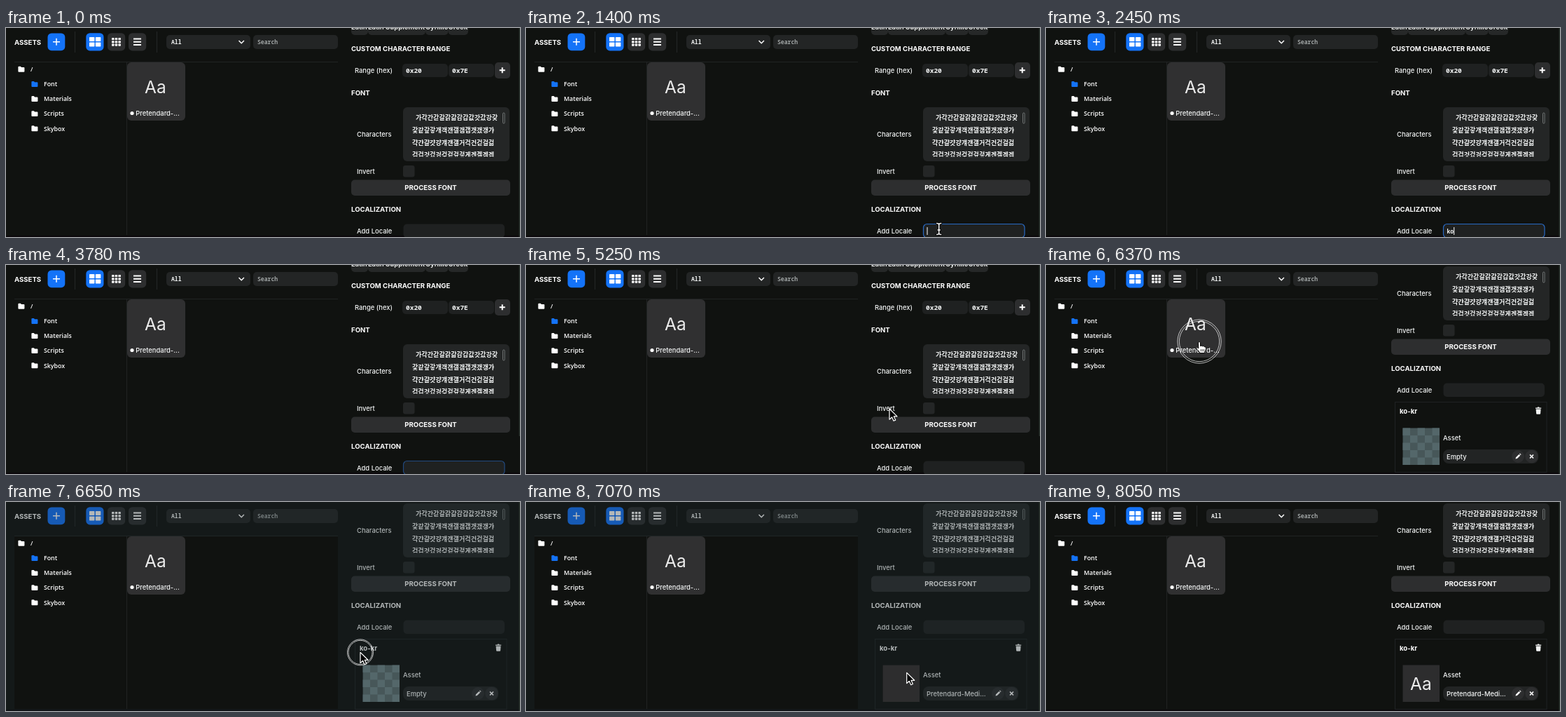
Write an HTML page that moves like this. It is 734 px wide and 298 px high and loops after 8470 ms.

```html
<!DOCTYPE html>
<html lang="en">
<head>
<meta charset="utf-8">
<title>Font locale</title>
<style>
  html, body { margin: 0; width: 100%; height: 100%; overflow: hidden; background: #101210; }
  svg { display: block; width: 734px; height: 298px; }
  text { font: 500 9.4px Inter, sans-serif; fill: #f4f6f6; white-space: pre; }
  .head { font-weight: 700; font-size: 9.6px; fill: #fff; }
  .chip { font-weight: 600; font-size: 9.6px; }
  .tree { font: 600 8.8px "Open Sans", sans-serif; fill: #fff; }
  .mono { font: 600 8.1px "Noto Sans Mono", monospace; }
  .hex { font: 600 9.5px "Noto Sans Mono", monospace; }
  .ko { font: 700 9.1px "Noto Sans CJK KR", "Noto Sans CJK", sans-serif; }
  .big { font-weight: 400; font-size: 24.5px; fill: #ececec; }
</style>
</head>
<body>
<svg id="stage" viewBox="0 0 734 298" xmlns="http://www.w3.org/2000/svg"></svg>
<script>
const LOOP = 8470, STEP = 70;
const FIELD = '#1f2121', BUTTON = '#2d2e2f', BLUE = '#1473f8';

const box = (x, y, w, h, r, fill, more = '') =>
  `<rect x="${x}" y="${y}" width="${w}" height="${h}" rx="${r}" fill="${fill}" ${more}/>`;
const label = (x, y, s, cls = '', more = '') =>
  `<text x="${x}" y="${y}" class="${cls}" ${more}>${s}</text>`;
const line = (d, color, w = 1, more = '') =>
  `<path d="${d}" fill="none" stroke="${color}" stroke-width="${w}" ${more}/>`;
const folder = (x, y, color = '#fff') =>
  `<path d="M${x} ${y + 1}q0-1 1-1h2.4l1.2 1.3h3.4q1 0 1 1v4.6q0 1-1 1h-7q-1 0-1-1z" fill="${color}"/>`;
const cells = (x, y, n, w, h, gap) => {
  let s = '';
  for (let i = 0; i < n * n; i++)
    s += box(x + (i % n) * (w + gap), y + Math.floor(i / n) * (h + gap), w, h, .7, '#fff');
  return s;
};
const cross = (x, y, r, w) => line(`M${x - r} ${y}h${2 * r}M${x} ${y - r}v${2 * r}`, '#fff', w);

function toolbar() {
  return label(12, 23.7, 'ASSETS', 'head')
    + box(59.5, 7.4, 24.8, 24.8, 5.5, BLUE) + cross(72, 19.8, 5, 1.5)
    + line('M98.5 5v30M215.5 5v30', '#242727')
    + box(114.3, 7.2, 25.2, 25.2, 5.5, BLUE) + cells(119, 13, 2, 7.4, 6, 1.5)
    + box(145, 7.2, 25.2, 25.2, 5.5, BUTTON) + cells(151, 14, 3, 3.5, 3.1, 1.2)
    + box(175, 7.2, 25.2, 25.2, 5.5, BUTTON) + line('M182 15.4h11M182 19.7h11M182 24h11', '#fff', 2)
    + box(229, 10, 120, 20, 5, '#232525') + label(236, 23, 'All', 'mono')
    + line('M332.5 18l3.7 3.7 3.7-3.7', '#fff', 1.5)
    + box(353, 10, 121, 20, 5, '#232525') + label(359, 23, 'Search', 'mono', 'style="fill:#a0a5a5"');
}

function assets() {
  const names = ['Font', 'Materials', 'Scripts', 'Skybox'];
  return line('M12 48.5H474M172.5 49V295', '#202323')
    + folder(17.4, 54.8) + label(35, 62, '/', 'tree')
    + names.map((n, i) => folder(36.4, 76 + 21.1 * i, i ? '#fff' : BLUE)
      + label(54, 83.2 + 21.1 * i, n, 'tree')).join('')
    + box(173, 49, 83, 83, 6, '#303031')
    + label(198, 92.6, 'Aa', 'big')
    + '<circle cx="180" cy="121.5" r="2.6" fill="#fff"/>'
    + label(185.3, 124.7, 'Pretendard-...');
}

function chips() {
  const list = [['Latin', 493, 24], ['Latin Supplement', 517, 82], ['Cyrillic', 599, 32.5], ['Greek', 631.5, 28.5]];
  return list.map(([s, x, w]) => box(x, -14, w, 24, 5, '#262828') + label(x, 2, s, 'chip')).join('');
}

function characters() {
  const rows = ['가각간갇갈갉갊감갑값갓갔강갖', '갗같갚갛개객갠갤갬갭갯갰갱갸',
    '갹갼걀걋걍걔걘걜거걱건걷걸걺', '검겁것겄겅겆겉겊겋게겐겔겜겝'];
  return box(567, 113, 152, 77, 6, '#242626') + '<g clip-path="url(#area)">'
    + rows.map((s, i) => label(i ? 580 : 585, 131.2 + 17.7 * i, s, 'ko')).join('') + '</g>'
    + box(709.5, 121, 2.6, 15, 1.3, 'none', 'stroke="#858989" stroke-width=".8"');
}

function checker() {
  let s = box(509.5, 343.5, 52.5, 52.5, 0, '#475759');
  const c = 52.5 / 5;
  for (let i = 0; i < 25; i += 2)
    s += box(509.5 + i % 5 * c, 343.5 + Math.floor(i / 5) * c, c, c, 0, '#54676a');
  return `<g id="checker">${s}</g>`;
}

function inspector() {
  return chips()
    + label(493, 33, 'CUSTOM CHARACTER RANGE', 'head')
    + label(498, 64, 'Range (hex)')
    + box(566, 51, 65, 19, 5, FIELD) + label(571, 64, '0x20', 'hex')
    + box(632, 51, 65, 19, 5, FIELD) + label(637, 64, '0x7E', 'hex')
    + box(698, 49, 22, 23, 5, BUTTON) + cross(708.7, 60.3, 4, 2)
    + label(493, 95.5, 'FONT', 'head')
    + label(501, 155, 'Characters') + characters()
    + label(501, 207.5, 'Invert') + box(567, 196, 16.5, 16.5, 3, '#242626')
    + box(493, 216.5, 227, 22.5, 5, BUTTON)
    + label(606.5, 231.2, 'PROCESS FONT', 'head', 'text-anchor="middle"')
    + label(493, 261.5, 'LOCALIZATION', 'head')
    + label(501, 292.5, 'Add Locale')
    + box(567.5, 279.5, 144.5, 19.5, 5, FIELD, 'id="field"')
    + label(572.5, 292.5, '', 'mono', 'id="typed"')
    + box(572.5, 284, 1, 11, 0, '#fff', 'id="caret"')
    + box(498.5, 306.5, 216.5, 100, 0, 'none', 'stroke="#1f2223"')
    + label(505, 323, 'ko-kr', 'head')
    + '<path d="M699 314.5h2.5l.6-1h2l.6 1h2.5v1.2h-8.2zM699.6 316.6h7l-.5 6.2q-.1 1-1 1h-4q-.9 0-1-1z" fill="#f2f4f4"/>'
    + checker()
    + box(509.5, 343.5, 52.5, 52.5, 0, '#2d2d2e', 'id="slot"')
    + label(520, 378.6, 'Aa', 'big', 'id="thumb"')
    + label(567, 361, 'Asset')
    + box(567, 374, 136, 20, 8, '#222424') + label(572, 387.5, '', '', 'id="asset"')
    + `<circle cx="674" cy="384" r="9" fill="${BUTTON}"/><circle cx="693.5" cy="384" r="9.3" fill="${BUTTON}"/>`
    + '<path d="M670.5 387.6l.5-2.3 4.4-4.4 1.8 1.8-4.4 4.4zM676 380.3l.8-.8 1.8 1.8-.8.8z" fill="#fff"/>'
    + line('M691 381.5l5 5M696 381.5l-5 5', '#fff', 1.7);
}

function pointers() {
  const edge = 'stroke-linejoin="round" stroke-linecap="round"';
  const beam = (color, w) =>
    line('M-3-8Q0-8 0-6Q0-8 3-8M0-6V6M-3 8Q0 8 0 6Q0 8 3 8M-1.6 1.5h3.2', color, w, edge);
  return `<g id="ring" fill="none" stroke="#fff"><circle id="outer" stroke-width=".7"/><circle id="inner" stroke-width=".7"/></g>
    <path id="arrow" d="M0 0V15.2L3.6 11.9 6 17.3 8.7 16.1 6.3 10.9H11Z" fill="#000" stroke="#fff" stroke-width="1.2" ${edge}/>
    <g id="beam">${beam('#000', 3.4)}${beam('#fff', 1.5)}</g>
    <g id="hand"><path d="M-1.5 1.4Q0-.6 1.5 1.4V6.6Q3.4 5.2 4.4 6.8Q6.2 5.8 7 7.6Q9.2 7 9.4 9.4Q9.6 12.6 7.7 14.9V16.6H.4V15.2Q-2.4 12.8-4.6 9.6Q-4.4 7.6-1.5 9.6Z" fill="#fff" stroke="#000" ${edge}/>
    ${line('M2.2 11v3.4M4.3 11v3.4M6.4 11v3.4', '#000', .7)}</g>`;
}

const stage = document.getElementById('stage');
stage.innerHTML = '<defs><clipPath id="area"><rect x="567" y="113" width="152" height="70.5"/></clipPath></defs>'
  + box(0, 0, 734, 298, 0, '#101210') + box(0, 296, 734, 2, 0, '#0b080b')
  + toolbar() + assets() + `<g id="panel">${inspector()}</g>`
  + '<path id="dim" d="M0 0H734V298H0ZM12 49V295H474V49ZM509.5 232.5V285H562V232.5Z" fill="#1e292b" fill-rule="evenodd"/>'
  + box(732.6, 0, 1.4, 298, 0, '#2a332d', 'id="bar"')
  + pointers();

const el = {};
stage.querySelectorAll('[id]').forEach(n => el[n.id] = n);
const set = (n, attrs) => { for (const k in attrs) n.setAttribute(k, attrs[k]); };
const show = (n, on) => set(n, { visibility: on ? 'visible' : 'hidden' });
const ramp = (t, a, b) => Math.min(1, Math.max(0, (t - a) / (b - a)));
const smooth = p => p * p * (3 - 2 * p);
const mix = (a, b, p) => a + (b - a) * p;

// time, x, y of the pointer's hot spot
const path = [
  [70, 64, 7], [560, 598, 291], [700, 598, 291], [910, 593, 289],
  [4550, 526, 240], [4690, 411, 191], [4760, 411, 191], [5250, 519, 205], [5670, 519, 205],
  [6300, 219, 109], [6370, 219, 109], [6580, 499, 209], [6860, 543.7, 243.4],
  [7210, 543.7, 243.4], [7910, 459, 280], [8050, 457, 300]
];
function pointerAt(t) {
  let i = 0;
  while (i < path.length - 2 && t >= path[i + 1][0]) i++;
  const a = path[i], b = path[i + 1], p = smooth(ramp(t, a[0], b[0]));
  return [mix(a[1], b[1], p), mix(a[2], b[2], p)];
}

const keys = [2240, 2450, 2800, 3290, 3500];
const between = (t, a, b) => t >= a && t < b;

function draw(t) {
  const scrolled = smooth(ramp(t, 5250, 5670));
  set(el.panel, { transform: `translate(0 ${-111 * scrolled})` });
  set(el.bar, { height: t < 3780 ? 298 : mix(244, 298, scrolled) });

  const focus = ramp(t, 980, 1260) * (1 - ramp(t, 4200, 4410)) * (t < 3780 ? 1 : .6);
  set(el.field, { stroke: '#2869c4', 'stroke-opacity': focus, 'stroke-width': 1.2 });
  const count = t < 3780 ? keys.filter(k => t >= k).length : 0;
  el.typed.textContent = 'ko-kr'.slice(0, count);
  set(el.caret, { x: 572.5 + 4.86 * count });
  show(el.caret, between(t, 1050, 1820) || between(t, 2240, 3780));

  const dropped = t >= 6860;
  el.asset.textContent = dropped ? 'Pretendard-Medi...' : 'Empty';
  show(el.slot, dropped);
  show(el.checker, !dropped);
  show(el.thumb, t >= 7980);
  set(el.dim, { opacity: .33 * ramp(t, 6370, 6580) * (1 - ramp(t, 7070, 7280)) });

  const [x, y] = pointerAt(t);
  const at = { transform: `translate(${x} ${y})` };
  const visible = between(t, 70, 2240) || between(t, 4550, 8050);
  const beam = between(t, 560, 2240), hand = between(t, 6230, 6440);
  show(el.arrow, visible && !beam && !hand);
  show(el.beam, beam);
  show(el.hand, hand);
  [el.arrow, el.beam, el.hand, el.ring].forEach(n => set(n, at));

  const press = t < 4000 ? 700 : 6370;
  show(el.ring, between(t, 700, 1400) || between(t, 6370, 6860));
  const r = mix(31.2, 18.5, smooth(ramp(t, press, press + 210)));
  set(el.outer, { r });
  set(el.inner, { r: r * .92 });
}

const start = performance.now();
function tick() {
  const t = (performance.now() - start) % LOOP;
  draw(Math.floor(t / STEP) * STEP);
  requestAnimationFrame(tick);
}
tick();
</script>
</body>
</html>
```
